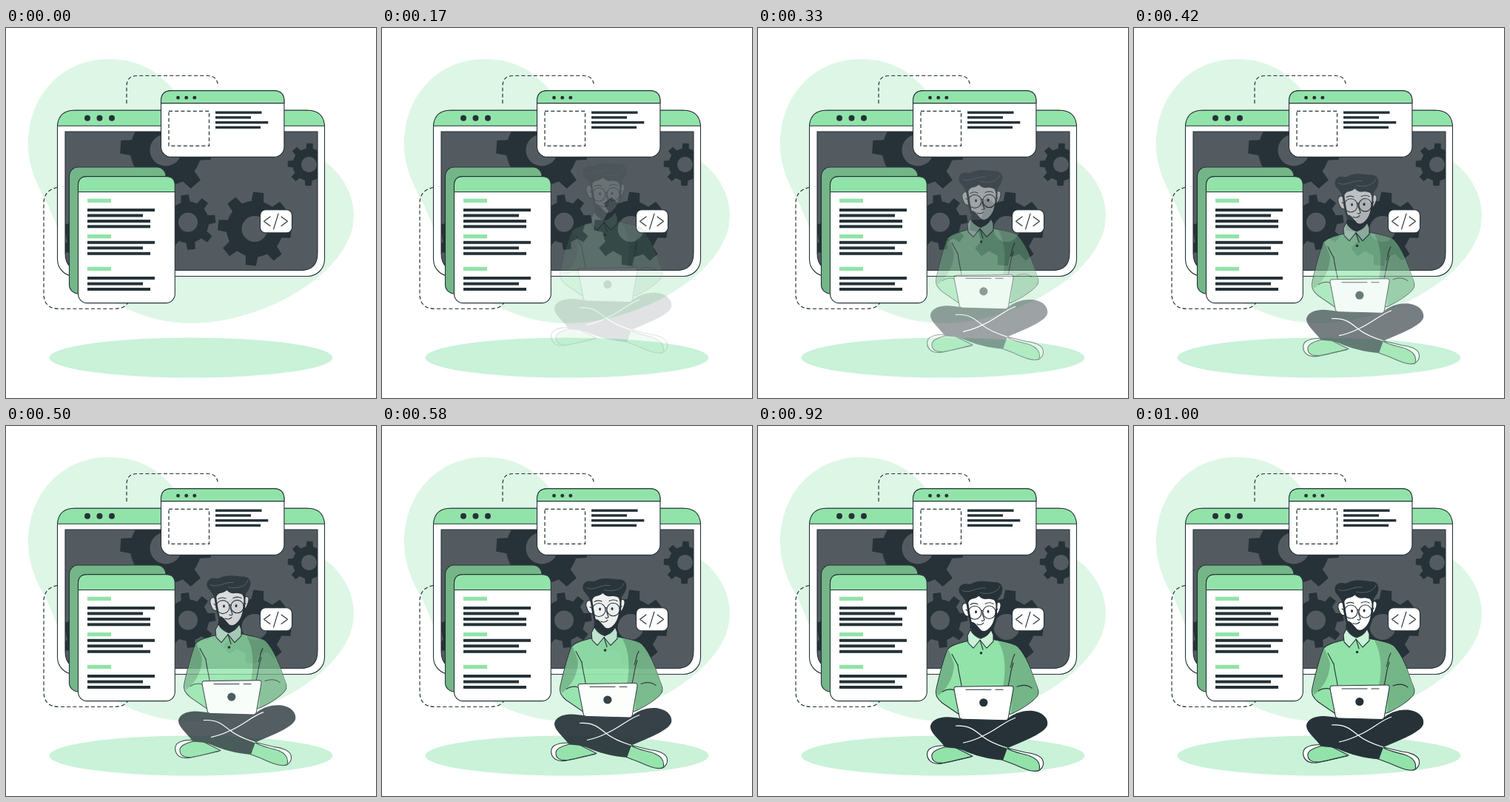
Write an HTML page that moves like this. It is 500 by 500 pixels and loops after 1040 ms.

```html
<!DOCTYPE html>
<html lang="en">
<head>
<meta charset="utf-8">
<title>Developer at work</title>
<style>
html, body { margin: 0; width: 100%; height: 100%; overflow: hidden; background: #fff; }
svg { display: block; width: 100vw; height: 100vh; }
.ink { fill: #263238; }
.green { fill: #92e3a9; }
.shade { fill: #74b687; }
.pale { fill: #c9f2d8; }
.white { fill: #fff; }
.grey { fill: #535b60; }
.line { stroke: #263238; stroke-width: 1.1; stroke-linecap: round; stroke-linejoin: round; }
.none { fill: none; }
.dash { fill: none; stroke: #263238; stroke-width: 1.2; stroke-dasharray: 5 3.2; }
</style>
</head>
<body>
<svg viewBox="0 0 500 500">
  <clipPath id="panel"><path d="M80 140H421V304Q421 327.500 398 327.500H103Q80 327.500 80 304Z"/></clipPath>

  <path fill="#def6e6" d="M139 42C183 42 212 62 236 96C275 155 398 150 438 186C461 207 470 231 470 254C470 328 350 399 250 399C193 399 125 372 93 318C76 290 69 266 57 240C45 215 30 193 30 157C30 92 75 42 139 42Z"/>
  <ellipse class="pale" cx="250" cy="445.500" rx="191.500" ry="27"/>
  <path class="dash" d="M163 102V79Q163 64.500 177 64.500H272Q286 64.500 286.500 79"/>
  <path class="dash" d="M69.500 215.500Q51 219 51 237V359Q51 379.500 72 379.500H146Q160 379.500 165 371"/>

  <!-- main window -->
  <rect class="white line" x="69.500" y="111.300" width="361" height="224.200" rx="23"/>
  <path class="green line" d="M69.500 132.200V131Q72 111.300 92.500 111.300H407.500Q428 111.300 430.500 131V132.200Z"/>
  <g class="ink"><circle cx="110" cy="121.700" r="4"/><circle cx="126.500" cy="121.700" r="4"/><circle cx="143" cy="121.700" r="4"/></g>
  <path class="grey" d="M80 140H421V304Q421 327.500 398 327.500H103Q80 327.500 80 304Z"/>
  <g id="gears" clip-path="url(#panel)"></g>
  <path class="none line" d="M80 140H421V304Q421 327.500 398 327.500H103Q80 327.500 80 304Z"/>

  <!-- document cards -->
  <rect class="shade line" x="85.500" y="188" width="130.500" height="171" rx="12"/>
  <rect class="white line" x="97.500" y="200.600" width="130.800" height="171" rx="12"/>
  <path class="green line" d="M97.500 221.500V212.600Q97.500 200.600 109.500 200.600H216.300Q228.300 200.600 228.300 212.600V221.500Z"/>

  <!-- popup -->
  <rect class="white line" x="209.500" y="84.600" width="166.400" height="89.800" rx="14"/>
  <path class="green line" d="M209.500 101.600V98.600Q209.500 84.600 223.500 84.600H361.900Q375.900 84.600 375.900 98.600V101.600Z"/>
  <g class="ink"><circle cx="232.500" cy="94.200" r="2.400"/><circle cx="243.700" cy="94.200" r="2.400"/><circle cx="254.800" cy="94.200" r="2.400"/></g>
  <rect class="dash" x="220" y="112.300" width="54.500" height="47"/>
  <g id="bars"></g>

  <!-- code badge -->
  <rect class="white line" x="343.500" y="245.700" width="43" height="31" rx="7"/>
  <path class="none line" d="M357 255L348.500 261.300L357 267.500M368 251L361.500 272M372 255L380.500 261.300L372 267.500"/>

  <g id="person">
    <!-- feet and legs -->
    <path class="white line" d="M262 432C250 430 238 431 232 435C227 439 228 447 232 451C236 455 244 456 252 454L288 446Z"/>
    <path class="green line" d="M262 431C248 433 237 436 235 443C234 451 240 455 251 454C264 452 276 448 290 445Z"/>
    <path class="white line" d="M337 434L362 440C373 441 383 445 385 451C387 458 383 463 378 465Z"/>
    <path class="green line" d="M336 434C347 441 358 441 368 445C378 449 382 456 380 464C372 468 357 461 346 456L330 450Z"/>
    <path class="ink" d="M239 396C249 390 262 392 274 394L336 396C344 387 360 382 373 384C385 386 393 394 391 403C388 412 371 420 337 434L331 450.500C312 449 292 444 277 437C264 432 256 435 252 432C246 423 232 413 233 404C234 400 236 398 239 396Z"/>
    <path fill="none" stroke="#fff" stroke-width="1.200" d="M267 404C285 403 292 409 303 418C313 426 324 430 337 434M348 393C333 398 322 410 303 418C295 422 287 425 277 427"/>

    <!-- shirt -->
    <path class="green line" d="M285 289C271 292 260 295 256 301C250 316 245 336 241 354C239 363 243 368 249 373L271 388L341 388L344 387C356 381 369 374 377 364C381 359 378 354 375 346C369 328 363 310 351 297C344 292 330 290 317 287Z"/>
    <path class="shade" d="M257 300C251 315 246 335 242 354C241 358 242 361 244 363L249 358C259 348 264 337 265 321C263 313 260 307 257 300Z"/>
    <path class="shade" d="M325 290C338 292 347 294 351 298C362 310 370 330 377 351C380 358 378 363 374 367C364 376 354 382 342 387L344 351H331C335 331 335 308 325 290Z"/>
    <path class="none line" d="M262 307L270 322M270 321C271 332 274 342 275 350M249 358C255 354 261 354 266 356M347 307C343 313 344 319 341 325M345 319C340 333 341 340 338 350M350 351C358 348 365 349 370 353"/>
    <circle class="ink" cx="301.500" cy="305.500" r="1.800"/>

    <!-- head -->
    <path class="white line" d="M283 239C277 236 274 242 277 249C279 255 282 257 285 255ZM321 239C326 234 330 238 327 246C325 253 322 255 319 254Z"/>
    <path class="ink" d="M281 234C283 250 285 264 290 274C293 281 299 285 306 283C317 280 322 268 323 253L324 230L300 218Z"/>
    <path class="pale line" d="M287 274L283 282L284 292L291 299L300 288L309 299L318 290V281L315 274C311 279 307 284 301 286C295 284 290 280 287 274Z"/>
    <path class="none line" d="M300 288L304 301"/>
    <path class="ink" d="M287 271C290 280 297 285 302 285C308 285 314 279 317 271Z"/>
    <path class="white" d="M284 236C286 249 287 257 289 264C292 262 298 271 302 275C308 278 315 271 318 263C321 254 322 243 321 235C312 230 306 234 299 228C294 233 287 231 284 236Z"/>
    <path class="ink" d="M282 241C281 235 277 231 275 228C270 224 270 216 276 213C281 210 285 215 290 211C299 207 312 209 319 210C327 209 332 215 330 222C329 228 325 231 323 235L322 241C321 237 319 232 315 231C308 234 302 233 298 228C294 233 287 231 285 236Z"/>
    <path fill="none" stroke="#6d767a" stroke-width=".7" d="M276 221C286 226 296 216 308 218M300 224C311 227 324 224 327 215"/>
    <g class="none line"><circle cx="293" cy="251" r="9"/><circle cx="312.500" cy="250.500" r="8.700"/>
      <path d="M301.500 249Q303 247 304 249M284 249L281 247M321 249L324 246M287 240Q291 237 297 239.500M307 239Q313 236 318 239M303 250C303 255 306 259 306 261Q304 263 302 261.500M296 266.500Q301 269 305 265"/></g>
    <g class="ink"><ellipse cx="294.500" cy="250" rx="1.500" ry="2"/><ellipse cx="311" cy="249.500" rx="1.500" ry="2"/></g>

    <!-- laptop -->
    <path class="white line" d="M268 351L342 350Q345.500 350 345 354L338.500 392Q338 396.500 334 396.500L277 395Q272.500 395 272 391L265 355Q264.500 351 268 351Z"/>
    <path class="none line" d="M281 355H315M321 355H331"/>
    <circle class="ink" cx="304.800" cy="372.500" r="5.600"/>
  </g>
</svg>
<script>
const el = id => document.getElementById(id);

function gear(x, y, outer, root, hole, phase) {
  const step = 45, points = [];
  for (let i = 0; i < 8; i++) {
    for (const [part, r] of [[-.28, root], [-.18, outer], [.18, outer], [.28, root]]) {
      const a = (phase + (i + part) * step) * Math.PI / 180;
      points.push((x + r * Math.cos(a)).toFixed(2) + ',' + (y + r * Math.sin(a)).toFixed(2));
    }
  }
  return `<polygon class="ink" points="${points.join(' ')}"/>
    <circle class="ink" cx="${x}" cy="${y}" r="${root}"/>
    <circle class="grey" cx="${x}" cy="${y}" r="${hole}"/>`;
}

el('gears').innerHTML = [
  [216, 165, 62, 48, 21.5, 4], [246, 262.5, 37.5, 28, 13, -7],
  [336, 271.5, 50, 38, 17.5, 6], [409.5, 184.5, 29, 22, 10.5, 2],
  [112, 278, 40, 31, 14, 12]
].map(g => gear(...g)).join('');

const bar = (x, y, w, h, color) => `<rect class="${color}" x="${x}" y="${y}" width="${w}" height="${h}"/>`;
el('bars').innerHTML =
  [230.7, 279, 322.8].map(y => bar(110, y, 32, 5.3, 'green')).join('') +
  [[244, 91], [251.4, 75], [259, 85], [266.3, 85], [287.8, 91], [295.3, 75], [302.8, 85],
   [336, 91], [343.6, 75], [351, 85]].map(([y, w]) => bar(110, y, w, 4, 'ink')).join('') +
  [[112.5, 62.5], [119.2, 48], [126, 71.3], [132.6, 61]].map(([y, w]) => bar(283, y, w, 3.4, 'ink')).join('');

// Cubic bezier easing (.36, -.01, .5, 1.38), which overshoots before it settles
function ease(p) {
  if (p >= 1) return 1;
  const curve = (s, a, b) => 3 * (1 - s) ** 2 * s * a + 3 * (1 - s) * s * s * b + s ** 3;
  let low = 0, high = 1;
  for (let i = 0; i < 24; i++) {
    const mid = (low + high) / 2;
    if (curve(mid, .36, .5) < p) low = mid; else high = mid;
  }
  return curve(low, -.01, 1.38);
}

const LOOP = 1040, TICK = 1000 / 24, DROP = 30;
const person = el('person');

function draw() {
  const tick = Math.floor((performance.now() % LOOP + 5) / TICK);
  const e = ease((tick + .7) / 24.3);
  person.setAttribute('opacity', tick < 3 ? 0 : Math.min(1, e));
  person.setAttribute('transform', `translate(0 ${(DROP * (e - 1)).toFixed(3)})`);
  requestAnimationFrame(draw);
}
draw();
</script>
</body>
</html>
```
